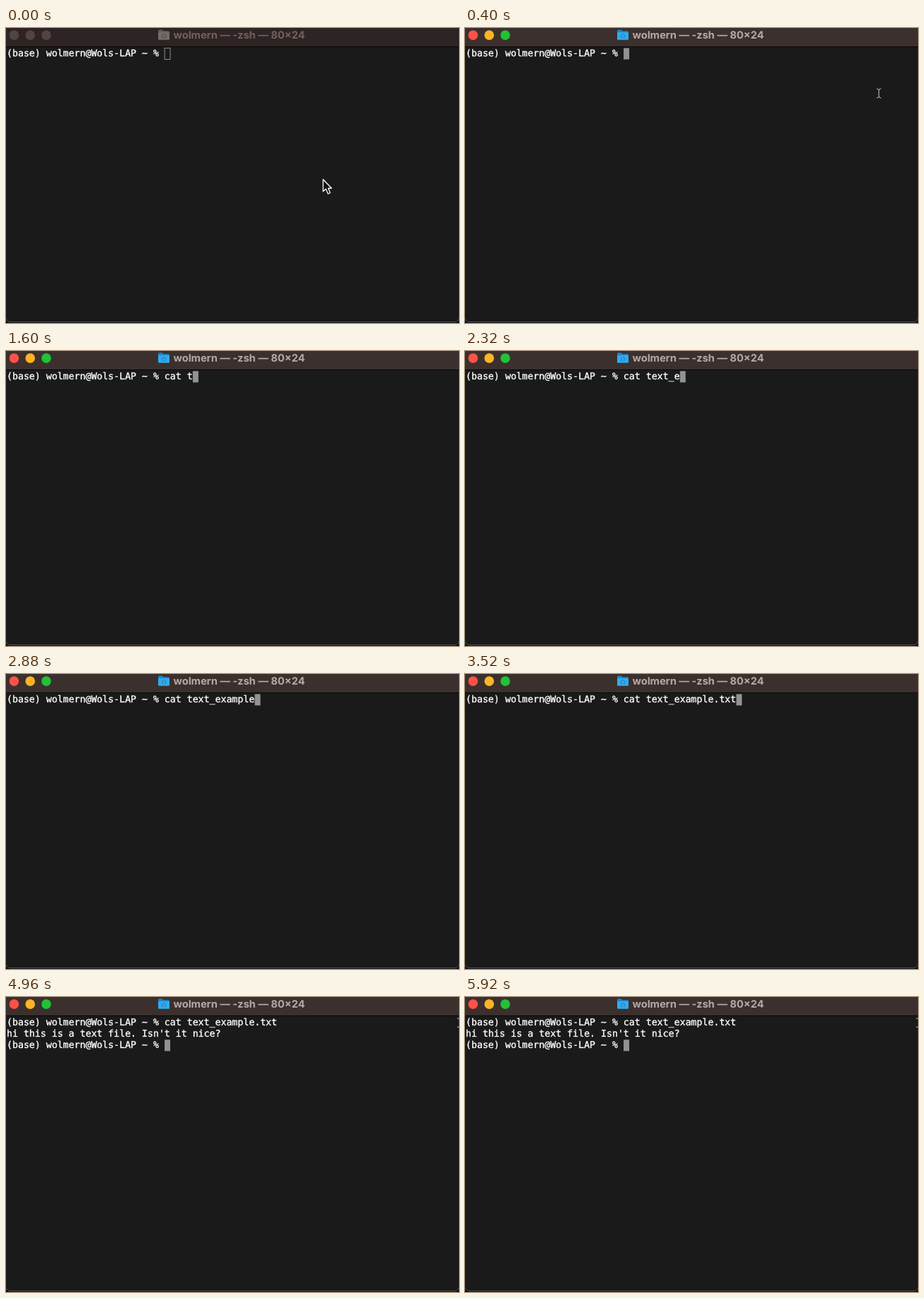
These frames come from a looping animation (640x417 px, 6.24 s). An HTML page:

```html
<!DOCTYPE html>
<html lang="en">
<head>
<meta charset="utf-8">
<title>Terminal</title>
<style>
  html, body { margin: 0; width: 100%; height: 100%; overflow: hidden; background: #0c0c0c; }
  #stage { position: relative; width: 640px; height: 417px; overflow: hidden; background: #0c0c0c; }
  #win {
    position: absolute; left: -1px; top: -12px; width: 640px; height: 426px;
    box-sizing: content-box; border: 1px solid #555; border-radius: 7px; background: #1a1a1a;
  }
  #bar {
    position: absolute; left: 0; top: 0; width: 640px; height: 27px;
    background: #2e2423; border-bottom: 1px solid #080808; box-sizing: border-box;
  }
  .on #bar { background: #3b302d; }
  #bar svg, #over { position: absolute; left: 0; top: 0; }
  .light { fill: #524442; }
  .fold-back { fill: #655b59; }
  .fold-front { fill: #746a68; }
  .home { stroke: #544846; }
  .on .red { fill: #ff5147; }
  .on .yellow { fill: #ffb424; }
  .on .green { fill: #20c236; }
  .on .fold-back { fill: #1687cf; }
  .on .fold-front { fill: #33a9ec; }
  .on .home { stroke: #1980bf; }
  #name {
    position: absolute; left: 236.5px; top: 0;
    font: 700 14.6px/20px Inter, "Open Sans", sans-serif; color: #70625f;
    white-space: pre; text-rendering: geometricPrecision;
  }
  .on #name { color: #b5aaa7; }
  #text {
    position: absolute; left: 1px; top: 29px; margin: 0; color: #fff;
    font: 13.22px/16px "DejaVu Sans Mono", "Noto Sans Mono", monospace;
    -webkit-text-stroke: 0.35px #fff;
    text-rendering: geometricPrecision; font-variant-ligatures: none;
  }
  #caret { fill: none; stroke: #8f8f8f; }
  .on #caret { fill: #929292; stroke: none; }
</style>
</head>
<body>
<div id="stage">
  <div id="win"></div>
  <div id="bar">
    <svg width="640" height="26">
      <circle class="light red" cx="11.4" cy="10.1" r="6.8"/>
      <circle class="light yellow" cx="34.2" cy="10.1" r="6.8"/>
      <circle class="light green" cx="56.9" cy="10.1" r="6.8"/>
      <path class="fold-back" d="M215 4q0-1.5 1.5-1.5h4l2 1.7h7q1.5 0 1.5 1.5v4h-16z"/>
      <rect class="fold-front" x="215" y="6" width="16" height="10.8" rx="1.3"/>
      <path class="home" d="M219.8 11l3.2-2.7 3.2 2.7M220.8 10.7v3h1.4M225.2 10.7v3h-1.4" fill="none"/>
    </svg>
    <div id="name">wolmern — -zsh — 80×24</div>
  </div>
  <pre id="text"></pre>
  <svg id="over" width="640" height="417">
    <rect id="caret" width="7.96" height="16"/>
    <path id="arrow" d="M0 0V17L4 13.5L7 20.5L10 19L7.3 12.5H12Z" fill="#111" stroke="#fff" stroke-width="1.3" stroke-linejoin="round"/>
    <path id="beam" d="M-3-6.5Q0-6.5 0-4Q0-6.5 3-6.5M0-4V4M-3 6.5Q0 6.5 0 4Q0 6.5 3 6.5" fill="none" stroke="#c8c8c8"/>
  </svg>
</div>
<script>
const LOOP = 6240, STEP = 80;
const FOCUS = 240, LEAVE = 640, ENTER = 3920;
const CELL = 7.96, LINE = 16;
const prompt = "(base) wolmern@Wols-LAP ~ % ";
const command = "cat text_example.txt";
const reply = "hi this is a text file. Isn't it nice?";

// One time per typed character of the command.
const keys = [
  1280, 1360, 1440, 1520, 1600, 1760, 1920, 2000, 2160, 2320,
  2480, 2560, 2640, 2720, 2800, 2880, 3040, 3200, 3360, 3520
];

const $ = id => document.getElementById(id);
const stage = $("stage"), text = $("text"), caret = $("caret");
const arrow = $("arrow"), beam = $("beam");

function place(el, shown, x, y) {
  el.style.display = shown ? "" : "none";
  el.setAttribute("transform", `translate(${x} ${y})`);
}

function drawMouse(t) {
  const p = Math.min(1, t / LEAVE);
  const ease = p * p * (3 - 2 * p);
  const x = 448 + 200 * ease, y = 214 - 178 * ease;
  place(arrow, t < FOCUS, x, y);
  if (t < ENTER) place(beam, t >= FOCUS && t < LEAVE, x, y);
  else place(beam, true, 640.5, 36.5);
}

function draw(t) {
  const typed = keys.filter(k => k <= t).length;
  let body = prompt + command.slice(0, typed);
  if (t >= ENTER) body += "\n" + reply + "\n" + prompt;
  if (text.textContent !== body) text.textContent = body;

  const lines = body.split("\n");
  const column = lines[lines.length - 1].length;
  place(caret, true, 1.2 + column * CELL, 28.4 + (lines.length - 1) * LINE);
  stage.classList.toggle("on", t >= FOCUS);
  drawMouse(t);
}

const start = performance.now();
function tick() {
  const t = (performance.now() - start) % LOOP;
  draw(Math.floor(t / STEP) * STEP);
  requestAnimationFrame(tick);
}
draw(0);
requestAnimationFrame(tick);
</script>
</body>
</html>
```
